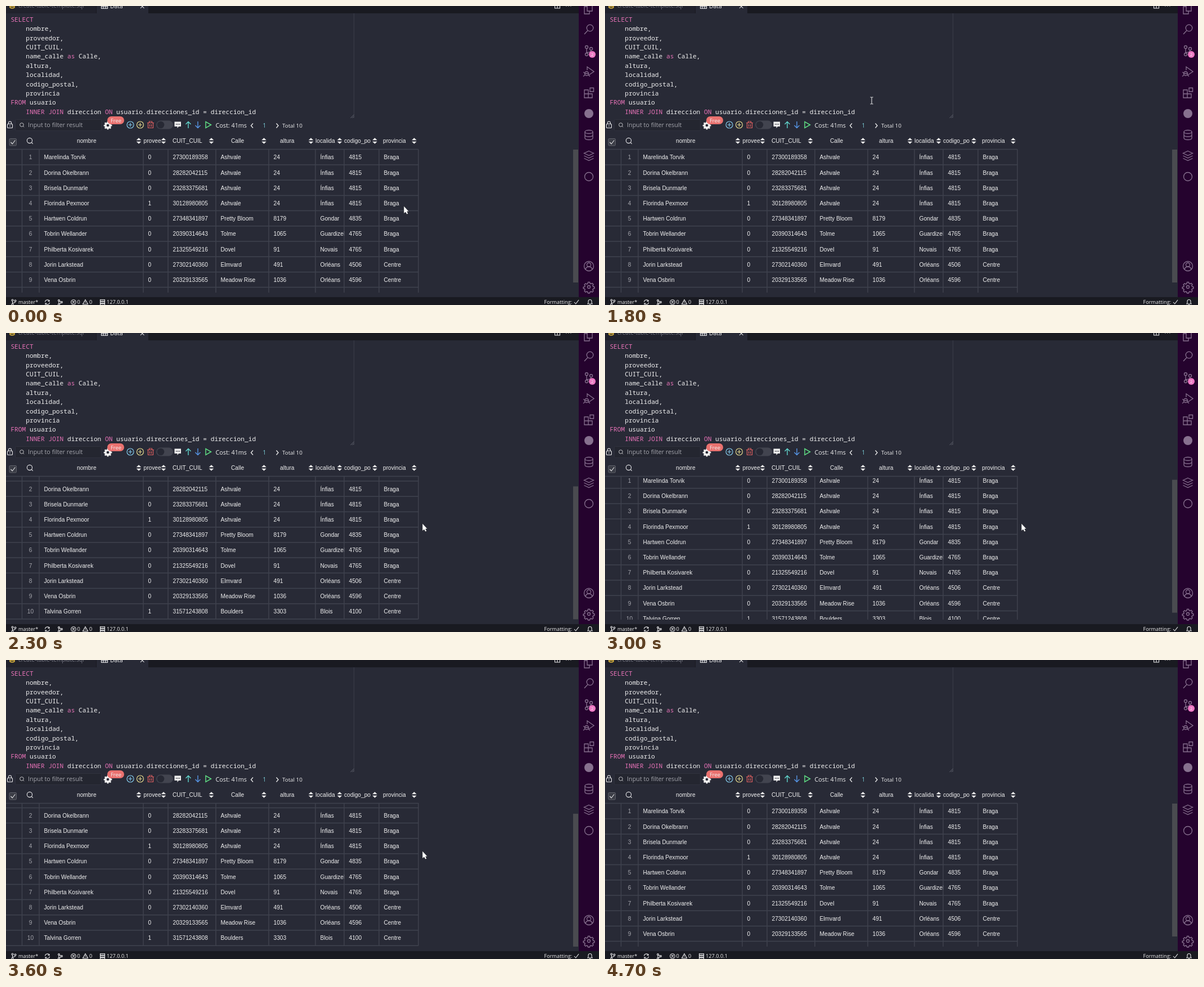
Recreate the animation shown at these times as an HTML page. Size 1054x531 px, loop 5.2 s.

```html
<!DOCTYPE html>
<html lang="es">
<head>
<meta charset="utf-8">
<title>SQL result</title>
<style>
  html, body { margin: 0; width: 100%; height: 100%; overflow: hidden; background: #282a36; }
  svg { display: block; width: 1054px; height: 531px; }
  text { fill: #f0f0f0; white-space: pre; }
  .ui { font-family: "Open Sans", "Noto Sans", sans-serif; }
  .cell { font: 10.2px "Liberation Sans", Arial, sans-serif; }
  .code { font: 11.18px "Noto Sans Mono", "DejaVu Sans Mono", monospace; }
  .key { fill: #e873b8; }
  .line { fill: none; stroke: #e8e8ea; stroke-width: 1.1; }
  .side { stroke: #87718f; stroke-width: 1.3; }
</style>
</head>
<body>
<svg viewBox="0 0 1054 531">
  <defs>
    <clipPath id="view"><rect y="254" width="734" height="255"/></clipPath>
    <path id="cog" d="M-1.3-7.5h2.6l.6 2 1.6.7 1.9-1 1.8 1.8-1 1.9.7 1.6 2 .6v2.6l-2 .6-.7 1.6 1 1.9-1.8 1.8-1.9-1-1.6.7-.6 2h-2.6l-.6-2-1.6-.7-1.9 1-1.8-1.8 1-1.9-.7-1.6-2-.6V.6l2-.6.7-1.6-1-1.9 1.8-1.8 1.9 1 1.6-.7z" transform="translate(0 -1.2)"/>
    <g id="lens"><circle r="4.6"/><path d="M3.2 3.2l2.6 2.6"/></g>
    <path id="sort" d="M-4.3-1.2L0-5.3l4.3 4.1zM-4.3 1.2L0 5.3l4.3-4.1z" fill="#eee"/>
  </defs>

  <!-- tabs -->
  <rect width="1018" height="13" fill="#191a21"/>
  <rect width="160" height="13" fill="#21222c"/>
  <rect x="161" width="92" height="13" fill="#282a36"/>
  <g class="ui" font-size="10">
    <text x="22" y="3.3" style="fill:#777985">create-table-template.sql</text>
    <text x="185" y="3.5" font-size="10.4">Data</text>
  </g>
  <path d="M7-3v5.5q4 3 8 0V-3M7-.5q4 3 8 0" fill="none" stroke="#d8b13c" stroke-width="1.6"/>
  <path d="M169.500-4h11v8.500h-11zM169.500 1h11M173-4v8.500M177-4v8.500" class="line"/>
  <path d="M239-3l6.500 7M245.500-3l-6.500 7M975.500-4v8h9v-8M980-4v8" class="line"/>
  <path d="M995 0h1.600M999 0h1.600M1003 0h1.600" class="line" stroke-width="1.600"/>

  <!-- editor -->
  <path d="M618.500 13v186" stroke="#3b3d49"/>
  <path d="M612.500 199l6-6M615.500 199l3-3" stroke="#777985" stroke-width=".8"/>
  <g id="code" class="code"></g>

  <!-- toolbar -->
  <rect x="16.500" y="201.500" width="153" height="20" rx="2" fill="#242630" stroke="#30323e"/>
  <rect x="2.500" y="209.500" width="9" height="7" rx="1" class="line"/>
  <path d="M4.500 209v-1.500a2.500 2.500 0 0 1 5 0v1.500M7 212v2" class="line"/>
  <use href="#lens" class="line" transform="translate(28 211) scale(.72)"/>
  <use href="#cog" transform="translate(181 212) scale(.83)" fill="#eee"/>
  <circle cx="181" cy="212" r="2.300" fill="#282a36"/>
  <rect x="180" y="196" width="30" height="14" rx="7" fill="#e9716f"/>
  <g fill="none" stroke-width="1.200">
    <path d="M217.500 211h7M221 207.500v7M215 211a6 6 0 1 0 12 0a6 6 0 1 0-12 0" stroke="#83c9ea"/>
    <path d="M235 211h7M238.500 207.500v7M232.500 211a6 6 0 1 0 12 0a6 6 0 1 0-12 0" stroke="#e2d78c"/>
    <path d="M251 207.500h12M254.500 207v-2h5v2M252.500 208v8.500h9V208M255.500 210v4.500M258.500 210v4.500" stroke="#dc5f60"/>
    <path d="M324 217v-11.500M319.500 210l4.500-4.500 4.500 4.500" stroke="#61d8cf" stroke-width="1.400"/>
    <path d="M341 205v11.500M336.500 212l4.500 4.500 4.500-4.500" stroke="#5798e8" stroke-width="1.400"/>
    <path d="M355 205.500v11l9.500-5.500z" stroke="#5fdc83" stroke-width="1.500"/>
    <path d="M439 208.500l-3.500 4 3.500 4M480.500 208.500l3.500 4-3.500 4" stroke="#eee" stroke-width="1.300"/>
  </g>
  <rect x="267" y="203.500" width="30" height="15" rx="7.500" fill="#42444f"/>
  <circle cx="275" cy="211" r="6.300" fill="#272934"/>
  <path d="M299.500 205.500h11.500v8.500h-4l-2.500 3v-3h-5z" fill="#eee"/>
  <path d="M302 210h1.500M304.700 210h1.500M307.400 210h1.500" stroke="#282a36" stroke-width="1.500"/>
  <g class="ui">
    <text x="39" y="215" font-size="10.800" style="fill:#a5a6ad">Input to filter result</text>
    <text x="186" y="207" font-size="9.400">Free</text>
    <text x="372.500" y="216" font-size="10.800">Cost: 41ms</text>
    <text x="456.500" y="216" font-size="10" style="fill:#7ed3dc">1</text>
    <text x="491" y="216" font-size="9.800">Total 10</text>
  </g>

  <!-- table -->
  <rect x="6" y="235.500" width="12.500" height="12.500" rx="1.500" fill="#3b3d46" stroke="#60626b"/>
  <path d="M8.500 242l2.800 3 5-6.500" class="line"/>
  <use href="#lens" class="line" transform="translate(42 239)"/>
  <g id="head" class="cell"></g>
  <g clip-path="url(#view)"><g id="rows" class="cell"></g></g>
  <path d="M0 254.600h733" stroke="#3f424e" stroke-width="1.500"/>
  <rect id="thumb" x="1008" y="255" width="9" height="236" fill="#4a4b50"/>

  <!-- activity bar -->
  <rect x="1018" width="36" height="518" fill="#25032e"/>
  <g fill="none" class="side">
    <path d="M1033-4h9v13h-9zM1033 1h-5v13h9v-5"/>
    <circle cx="1038" cy="39" r="5.800"/><path d="M1034 43.500l-6 6.500"/>
    <circle cx="1032" cy="73" r="2.500"/><circle cx="1040" cy="76" r="2.500"/><circle cx="1032" cy="86" r="2.500"/>
    <path d="M1032 75.500v8M1040 78.500q0 4-8 4"/>
    <path d="M1033 114v-6l12 8.500-9 6"/><circle cx="1032" cy="120" r="3.500"/>
    <path d="M1026 117.500l3 1.500M1026 125l3-2.500M1038 125l-3-2.500M1028.500 120h7"/>
    <path d="M1028 149h7v7h7v7h-14zM1028 156h7v7M1038 145.500h6.500v6.500h-6.500z"/>
    <ellipse cx="1036" cy="223.500" rx="7" ry="3"/>
    <path d="M1029 223.500v11c0 4 14 4 14 0v-11M1029 229c0 4 14 4 14 0"/>
    <path d="M1036 257.500l8.500 4-8.500 4-8.500-4zM1027.500 266l8.500 4 8.500-4M1027.500 270.500l8.500 4 8.500-4"/>
    <circle cx="1036" cy="303" r="7.500"/>
    <circle cx="1036" cy="462" r="8.500"/><circle cx="1036" cy="459.500" r="3.500"/><path d="M1030 468q1-5 6-5t6 5"/>
    <use href="#cog" transform="translate(1036 500) scale(1.100)"/><circle cx="1036" cy="499" r="2.500"/>
  </g>
  <circle cx="1036" cy="191" r="8" fill="#87718f"/>
  <circle cx="1042" cy="86" r="6" fill="#ed78c3"/>
  <text x="1039.700" y="89" class="ui" font-size="8">2</text>

  <!-- status bar -->
  <rect y="517" width="1054" height="14" fill="#191a21"/>
  <g class="ui" font-size="9.200">
    <text x="22" y="529">master*</text><text x="126.500" y="529">0</text><text x="148" y="529">0</text>
    <text x="179" y="529">127.0.0.1</text><text x="956.500" y="529">Formatting:</text>
  </g>
  <g class="line" stroke-width="1">
    <circle cx="11.500" cy="522.500" r="1.500"/><circle cx="11.500" cy="530" r="1.500"/><circle cx="16.500" cy="523.500" r="1.500"/>
    <path d="M11.500 524v4.500M16.500 525q0 2.500-5 2.500"/>
    <path d="M69.500 525.500a4 4 0 0 1 7.500-1.500M77.500 526.500a4 4 0 0 1-7.500 1.500M77 522v2.500h-2.500M70 530.500V528h2.500"/>
    <circle cx="94" cy="523" r="1.400"/><circle cx="99" cy="526" r="1.400"/><circle cx="94" cy="530" r="1.400"/>
    <path d="M94 524.500v4M95 524l3 1.500M95 529l3-2"/>
    <circle cx="120" cy="526" r="4.300"/><path d="M118 524l4 4M122 524l-4 4M141 521.500l4.500 8h-9zM141 524.500v2.500"/>
    <path d="M167.500 521.500h8v2.500h-8zM167.500 525h8v2.500h-8zM167.500 528.500h8v2.500h-8z"/>
    <path d="M1010 526l2.700 3 5.300-7M1034 529h8l-1-2v-2.500a3 3 0 0 0-6 0v2.500zM1037 530.500h2"/>
  </g>

  <path id="arrow" d="M0 0V13.500L3.200 11.200 5.300 15 7.800 13.700 5.900 10H9.300Z" fill="#fff" stroke="#1c1d25" stroke-width=".7"/>
  <path id="beam" d="M-2.500-6H-.8L0-5.400.8-6H2.500M0-5.400V5.400M-2.500 6H-.8L0 5.400.8 6H2.500" fill="none" stroke="#f4f4f4"/>
</svg>
<script>
const $ = id => document.getElementById(id);
const PITCH = 27.2, TOP = 254.8, LOOP = 5200;

const code = `SELECT
    nombre,
    proveedor,
    CUIT_CUIL,
    name_calle as Calle,
    altura,
    localidad,
    codigo_postal,
    provincia
FROM usuario
    INNER JOIN direccion ON usuario.direcciones_id = direccion_id`;
$('code').innerHTML = code.split('\n').map((line, i) => {
  const text = line.trim(), x = 8.4 + (line.length - text.length) * 6.71;
  const marked = text.replace(/\b(SELECT|as|FROM|INNER|JOIN|ON)\b/g, '<tspan class="key">$1</tspan>');
  return `<text x="${x}" y="${28 + i * 16.36}">${marked}</text>`;
}).join('');

// title, text x, sort arrow x, column left edge
const columns = [
  ['nombre', 126, 236, 59], ['provee', 244.5, 280, 244], ['CUIT_CUIL', 296, 365, 288],
  ['Calle', 400, 458.5, 373], ['altura', 487, 542, 467], ['localida', 550, 593, 550],
  ['codigo_po', 601, 655.5, 601], ['provincia', 670, 725.5, 663]
];
$('head').innerHTML = columns.map(([title, x, sortX]) =>
  `<text x="${x}" y="243">${title}</text><use href="#sort" x="${sortX}" y="239.5"/>`).join('');

const data = `Marelinda Torvik|0|27300189358|Ashvale|24|Ínfias|4815|Braga
Dorina Okelbrann|0|28282042115|Ashvale|24|Ínfias|4815|Braga
Brisela Dunmarle|0|23283375681|Ashvale|24|Ínfias|4815|Braga
Florinda Pexmoor|1|30128980805|Ashvale|24|Ínfias|4815|Braga
Hartwen Coldrun|0|27348341897|Pretty Bloom|8179|Gondar|4835|Braga
Tobrin Wellander|0|20390314643|Tolme|1065|Guardizel|4765|Braga
Philberta Kosivarek|0|21325549216|Dovel|91|Novais|4765|Braga
Jorin Larkstead|0|27302140360|Elmvard|491|Orléans|4506|Centre
Vena Osbrin|0|20329133565|Meadow Rise|1036|Orléans|4596|Centre
Talvina Gorren|1|31571243808|Boulders|3303|Blois|4100|Centre`.split('\n');

const edges = [28.5, ...columns.map(c => c[3]), 733];
const bottom = TOP + PITCH * data.length;
$('rows').innerHTML = `<rect id="hover" width="733" height="${PITCH}" fill="#333644"/>` +
  data.map((row, i) => {
    const y = TOP + i * PITCH + 17.5;
    return `<text x="43.5" y="${y}" text-anchor="middle" style="fill:#a3a4ab">${i + 1}</text>` +
      row.split('|').map((value, c) => `<text x="${columns[c][3] + 8.5}" y="${y}">${value}</text>`).join('') +
      `<path d="M0 ${y - 17.5 + PITCH}h733" stroke="#3f424e" stroke-width="1.5"/>`;
  }).join('') +
  edges.map(x => `<path d="M${x} ${TOP}V${bottom}" stroke="#3f424e" stroke-width="1.5"/>`).join('');

// time, pointer x, pointer y, scroll, hovered row
const steps = [
  [0, 707, 355, 0], [200, 707, 355, 0, 4], [400, 694, 337, 0, 4], [500, 630, 240, 0], [600, 530, 130, 0],
  [700, 450, 46, 0], [800, 405, 82, 0], [900, 390, 144, 0], [1200, 403, 130, 0], [1800, 474, 168, 0],
  [1900, 560, 214, 0], [2000, 655, 280, 0], [2100, 720, 323, 0], [2200, 738, 336, 9], [2300, 740, 338, 18.9],
  [2500, 740, 338, 19.6], [3000, 740, 338, 6.2], [3300, 740, 338, 0], [3500, 740, 338, 10], [3600, 740, 339, 19.6],
  [3900, 740, 339, 10], [4000, 740, 339, 2], [4100, 738, 338, 0], [4200, 721, 333, 0], [4300, 430, 160, 0],
  [4400, 124, 31, 0], [4500, 124, 27, 0], [4600, 124, 23, 0], [4700, -50, 0, 0]
];

function draw(now) {
  const t = now % LOOP;
  const [, x, y, scroll, row] = steps.findLast(s => s[0] <= t);
  const inEditor = x < 618 && y < 198;
  const place = `translate(${x} ${y})`;
  $('beam').setAttribute('transform', place);
  $('arrow').setAttribute('transform', place);
  $('beam').style.display = inEditor ? '' : 'none';
  $('arrow').style.display = inEditor ? 'none' : '';
  $('rows').setAttribute('transform', `translate(0 ${-scroll})`);
  $('thumb').setAttribute('y', 255 + scroll * 0.92);
  $('hover').setAttribute('y', row ? TOP + (row - 1) * PITCH : -99);
  requestAnimationFrame(draw);
}
const start = performance.now();
draw(0);
requestAnimationFrame(function begin() {
  draw = (step => () => step(performance.now() - start))(draw);
});
</script>
</body>
</html>
```
